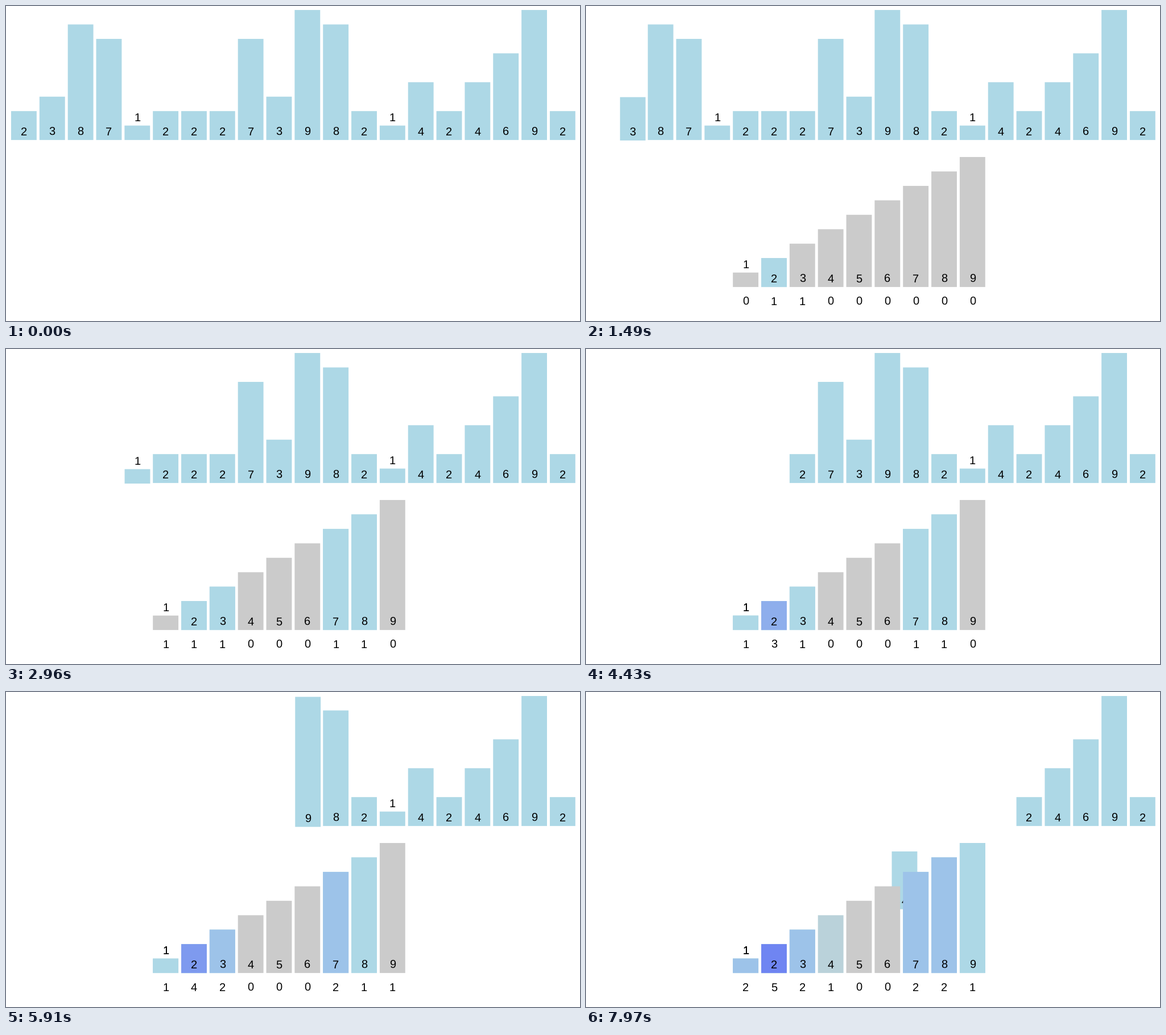
Write a matplotlib script that moves like this. It is 1009 by 555 pixels and loops after 8000 ms.

```python
import math

import matplotlib.pyplot as plt
import numpy as np
from matplotlib.animation import FuncAnimation
from matplotlib.patches import Rectangle

W, H, DPI = 1009, 555, 64
LOOP, STEP = 8000, 20

VALUES = [2, 3, 8, 7, 1, 2, 2, 2, 7, 3, 9, 8, 2, 1, 4, 2, 4, 6, 9, 2]
BUCKETS = range(1, 10)

LEFT, PITCH, BAR_W, UNIT = 9.0, 49.84, 44.86, 25.45
TOP_ROW, LOW_ROW = 236.1, 495.1
COUNT_Y = 527

# The screen refreshes in coarse ticks; each move takes half a period.
TICK, TICK_SHIFT = 147.35, 602
PERIOD, FIRST_MOVE = 490.6, 972.8
MOVE_TIME = PERIOD / 2

GREY = np.array([203, 203, 203])
BLUE = np.array([173, 216, 230])
DEEPER = np.array([-15.6, -20.8, 3.0])

plt.rcParams["font.family"] = "Liberation Sans"
plt.rcParams["text.hinting"] = "none"

fig = plt.figure(figsize=(W / DPI, H / DPI), dpi=DPI, facecolor="white")
ax = fig.add_axes([0, 0, 1, 1])
ax.set_xlim(0, W)
ax.set_ylim(H, 0)
ax.axis("off")


def ease(t):
    """Cubic in-out, clamped to 0..1."""
    t = min(max(t, 0), 1)
    return 4 * t ** 3 if t < 0.5 else 1 - 4 * (1 - t) ** 3


def slot_x(slot):
    return LEFT + PITCH * slot


def bucket_x(value):
    return slot_x(value + 4)


def shade(count):
    return BLUE + DEEPER * (count - 1) if count else GREY


def label(x, y, text, z):
    return ax.text(x, y, text, fontsize=20 * 72 / DPI, color="black",
                   ha="center", va="baseline", zorder=z)


class Bar:
    def __init__(self, value, x, base, color, z):
        self.value = value
        self.rect = Rectangle((x, base), BAR_W, value * UNIT, lw=0,
                              fc=color / 255, zorder=z, snap=False)
        ax.add_patch(self.rect)
        self.text = label(x, base, str(value), z)
        self.place(x, base)

    def place(self, x, base):
        self.rect.set_xy((x, base - self.value * UNIT))
        lift = 33.5 if self.value == 1 else 8.1
        self.text.set_position((x + BAR_W / 2, base - lift))

    def grow(self, p):
        self.rect.set_width(BAR_W * p)
        self.rect.set_height(self.value * UNIT * p)


items = [Bar(v, slot_x(i), TOP_ROW, BLUE, 10 + i)
         for i, v in enumerate(VALUES)]
buckets = [Bar(v, bucket_x(v), LOW_ROW, GREY, 40 + v) for v in BUCKETS]
counters = [label(bucket_x(v) + BAR_W / 2, COUNT_Y, "0", 60) for v in BUCKETS]


def progress(time, move):
    """Linear progress of a move; negative before it starts."""
    return (time - FIRST_MOVE - move * PERIOD) / MOVE_TIME


def update(frame):
    now = (frame + 0.5) * STEP
    time = TICK_SHIFT + TICK * math.floor((now - TICK_SHIFT) / TICK)

    counts = dict.fromkeys(BUCKETS, 0)
    colors = {v: GREY for v in BUCKETS}
    for i, (value, bar) in enumerate(zip(VALUES, items)):
        t = progress(time, i)
        p = ease(t)
        x = slot_x(i)
        bar.place(x + (bucket_x(value) - x) * p,
                  TOP_ROW + (LOW_ROW - TOP_ROW) * p)
        if t >= 0:
            old = shade(counts[value])
            counts[value] += 1
            colors[value] = old + (shade(counts[value]) - old) * p

    opening = progress(time, -1)
    for bar, counter in zip(buckets, counters):
        bar.grow(ease(opening))
        bar.rect.set_facecolor(colors[bar.value] / 255)
        counter.set_text(str(counts[bar.value]))
        for artist in (bar.rect, bar.text, counter):
            artist.set_visible(opening >= 0)
    return []


anim = FuncAnimation(fig, update, frames=LOOP // STEP, interval=STEP,
                     init_func=lambda: update(0), repeat=True,
                     repeat_delay=0, blit=False)
plt.show()
```
